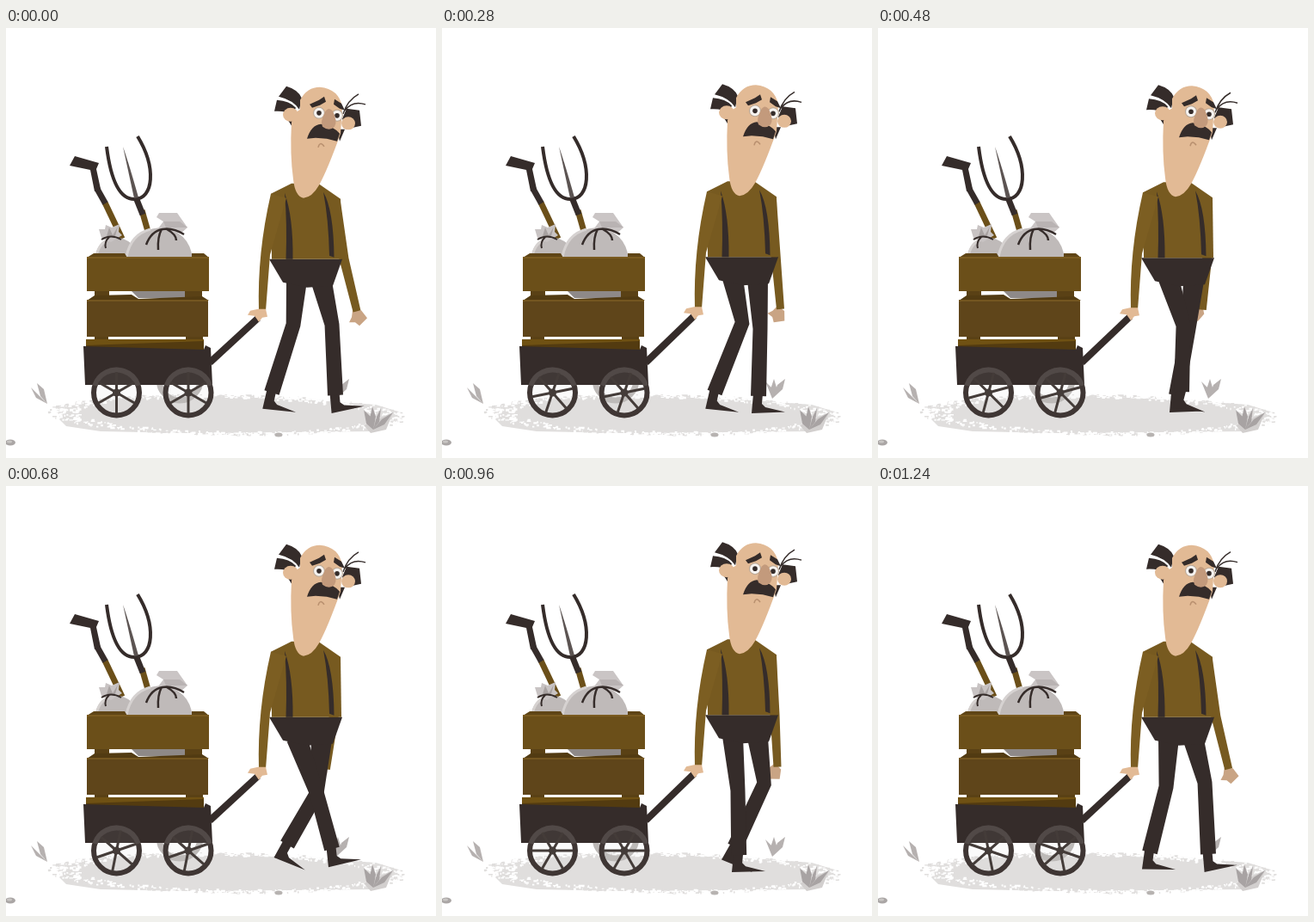
An HTML page with a canvas that plays this animation: 500x500 px, repeating every 1280 ms.

```html
<!DOCTYPE html>
<html lang="en">
<head>
<meta charset="utf-8">
<title>Farmer with a cart</title>
<style>
html, body { margin: 0; width: 100%; height: 100%; overflow: hidden; background: #fff; }
canvas { display: block; width: 500px; height: 500px; }
</style>
</head>
<body>
<canvas id="stage" width="500" height="500"></canvas>
<script>
const ctx = document.getElementById('stage').getContext('2d');
const LOOP = 1280, STEP = 40, TAU = Math.PI * 2;
const DARK = '#352c2a', OLIVE = '#6b4f19', SHIRT = '#775a20', SKIN = '#e2ba95', GREY = '#b6b1b0', SACK = '#bfbab9';

// Walk poses: time, knee x/y, ankle x/y, foot angle in degrees
const LEG_A = [
  [0, 334, 345, 309, 424, 8], [140, 343, 343, 304, 417, 30], [280, 349, 343, 317, 424, 8],
  [480, 355, 346, 353, 423, 10], [680, 361, 356, 379, 422, -11], [840, 350, 358, 359, 428, 0],
  [1080, 339, 350, 332, 429, 0], [1240, 335, 350, 316, 426, 3]
];
const LEG_B = [
  [0, 379, 345, 383, 427, -10], [280, 370, 350, 368, 428, 0], [480, 361, 350, 347, 427, 0],
  [680, 361, 358, 327, 417, 24], [840, 370, 350, 322, 414, 47], [1080, 378, 344, 363, 426, -3],
  [1240, 380, 345, 384, 428, -10]
];

function fill(color, d) {
  ctx.fillStyle = color;
  ctx.fill(new Path2D(d));
}
function line(color, width, d, cap = 'butt') {
  ctx.strokeStyle = color;
  ctx.lineWidth = width;
  ctx.lineCap = cap;
  ctx.stroke(new Path2D(d));
}
function oval(color, x, y, rx, ry = rx) {
  ctx.fillStyle = color;
  ctx.beginPath();
  ctx.ellipse(x, y, rx, ry, 0, 0, TAU);
  ctx.fill();
}
function ring(color, x, y, r, width, from = 0, to = TAU) {
  ctx.strokeStyle = color;
  ctx.lineWidth = width;
  ctx.lineCap = 'butt';
  ctx.beginPath();
  ctx.arc(x, y, r, from, to);
  ctx.stroke();
}

// Periodic cubic interpolation through the poses
function poseAt(keys, t) {
  const n = keys.length;
  const key = i => {
    const turn = Math.floor(i / n), k = keys[i - turn * n];
    return [k[0] + turn * LOOP, ...k.slice(1)];
  };
  let i = n - 1;
  while (keys[i][0] > t) i--;
  const [p, a, b, q] = [i - 1, i, i + 1, i + 2].map(key);
  const span = b[0] - a[0], u = (t - a[0]) / span;
  return a.slice(1).map((v, j) => {
    j++;
    const ma = (b[j] - p[j]) / (b[0] - p[0]) * span;
    const mb = (q[j] - a[j]) / (q[0] - a[0]) * span;
    const d = b[j] - v;
    return v + u * (ma + u * (3 * d - 2 * ma - mb + u * (ma + mb - 2 * d)));
  });
}

function makeSpecks(seed, count) {
  const path = new Path2D();
  const random = () => (seed = seed * 16807 % 2147483647) / 2147483647;
  for (let i = 0; i < count; i++) {
    const angle = random() * TAU, reach = 0.84 + random() * 0.18;
    path.rect(255 + Math.cos(angle) * 204 * reach, 449 + Math.sin(angle) * 23 * reach + Math.cos(angle) * 3,
      1 + random() * 4, 1 + random() * 1.5);
  }
  return path;
}
const greySpecks = makeSpecks(71, 650), whiteSpecks = makeSpecks(929, 420);

function ground() {
  fill('#e0dedd', 'M62 455L76 439L130 431L250 429L340 432L430 438L456 446L444 459L428 469L330 470L210 471L110 469L70 463Z');
  ctx.fillStyle = '#e0dedd';
  ctx.fill(greySpecks);
  ctx.fillStyle = '#fff';
  ctx.fill(whiteSpecks);
  fill(GREY, 'M29 418L48 437L35 430ZM36 413L44 420L48 437L40 428Z');
  fill(GREY, 'M376 411L383 418L384 431ZM386 408L389 418L384 431L382 420ZM399 408L396 420L384 431L390 415Z');
  fill('#d2cfce', 'M416 462L450 447L442 467L424 471Z');
  fill('#a8a3a3', 'M416 444L425 453L427 467L419 460ZM426 440L430 452L427 467L423 454ZM436 442L434 458L427 467L431 452ZM450 447L440 461L427 467L437 455Z');
  oval('#aaa6a5', 5, 482, 6, 3.5);
  oval('#c9c6c4', 4, 481, 3, 1.5);
  oval('#b7b3b1', 317, 473, 4.5, 2.5);
}

function tools() {
  line(OLIVE, 7, 'M115 203L135 245');
  line(DARK, 7, 'M106 187L115.5 204');
  fill(DARK, 'M80 149L108 157L105 164L110 187L103 190L98 165L74 160Z');
  line(OLIVE, 7, 'M158 212L166 240');
  line(DARK, 7, 'M151 197L159 217');
  line(DARK, 4, 'M117 138C121 170 130 199 149 199C172 199 175 162 153 126');
  fill('#5c5452', 'M136 138Q143 158 154 197L149 198Z');
}

function sacks() {
  fill(SACK, 'M103 268Q106 246 127 243Q151 246 154 268Z');
  line('#d6d2d0', 3, 'M105 265Q109 247 124 245');
  fill('#c8c3c3', 'M108 234L115 234L116 229L123 232L132 228L131 237L135 241L122 249L111 244Z');
  fill('#a8a2a1', 'M120 232L125 243L117 242ZM130 231L127 242L123 243Z');
  line(DARK, 2, 'M111 246Q122 239 134 246M120 243Q114 249 116 256');
  fill(SACK, 'M138 268Q143 235 180 232Q213 236 217 268Z');
  line('#d6d2d1', 3, 'M140 266Q145 240 168 234');
  fill('#cac5c5', 'M178 215L199 215L211 232L203 239L177 233L183 225L175 220Z');
  fill('#b9b3b3', 'M183 225L202 225L211 232L186 232Z');
  line(DARK, 2.5, 'M163 252Q169 236 182 234Q194 232 207 240M181 234Q176 243 177 258M187 234Q198 240 198 247');
}

function crate() {
  fill('#8e8988', 'M144 304H208V314H154Z');
  fill('#5a4115', 'M103 305H120V317H103ZM208 305H228V317H208ZM103 358H119V365H103ZM209 358H229V365H209Z');
  fill('#523b12', 'M94 317L103 311L146 310L154 315L228 312L236 317Z');
  fill('#5f4516', 'M94 267L102 262H138L141 267ZM216 262H230L236 267H216Z');
  fill(OLIVE, 'M94 267H236V306H94Z');
  line('#7a5b20', 2, 'M94 267H236');
  fill('#5f451a', 'M94 316H235V359H94Z');
  line('#745620', 2, 'M94 317H235');
  fill('#6f5113', 'M93 362H230V375H93Z');
  fill('#533b10', 'M93 369L230 364V375H93Z');
  fill(DARK, 'M90 370L230 374L232 369L238 372L240 415H92Z');
}

function wheel(x, y, turn) {
  oval('rgba(190,185,183,.08)', x, y, 26);
  ring('#3f3634', x, y, 26.5, 6);
  ring('#514947', x, y, 26.5, 6, Math.PI * 1.1, Math.PI * 1.9);
  ctx.save();
  ctx.translate(x, y);
  ctx.rotate(turn + TAU / 12);
  for (let i = 0; i < 6; i++) {
    ctx.rotate(TAU / 6);
    line('#443c39', 3, 'M0 0H24');
  }
  ctx.restore();
  oval('#443c39', x, y, 4.5);
}

function cart(turn, bob) {
  ring('#bdb9b7', 202, 409, 24, 7);
  tools();
  sacks();
  crate();
  line(DARK, 8, `M237 389L293 ${336 + bob}`);
  wheel(128.5, 424, turn);
  wheel(212, 424, turn);
}

// Tapered limb: joints are [x, y, half width]
function limb(color, joints) {
  const left = [], right = [];
  joints.forEach(([x, y, w], i) => {
    const a = joints[Math.max(i - 1, 0)], b = joints[Math.min(i + 1, joints.length - 1)];
    const len = Math.hypot(b[0] - a[0], b[1] - a[1]);
    const nx = (b[1] - a[1]) / len * w, ny = (a[0] - b[0]) / len * w;
    left.push([x - nx, y - ny]);
    right.unshift([x + nx, y + ny]);
  });
  fill(color, 'M' + left.concat(right).join('L') + 'Z');
}

function leg(keys, t, hipX, hipY) {
  const [kx, ky, ax, ay, angle] = poseAt(keys, t);
  ctx.save();
  ctx.translate(ax, ay);
  ctx.rotate(angle * Math.PI / 180);
  fill(DARK, 'M-6 -3L-8 20L31 18.5L8 13L4 9L5 -3Z');
  ctx.restore();
  limb(DARK, [[hipX, hipY, 12], [kx, ky, 8.5], [ax, ay, 9]]);
}

function farArm(swing) {
  const x = 390 + 18 * swing, y = 328;
  ctx.save();
  ctx.translate(x, y);
  ctx.rotate(0.8 * (1 - swing));
  fill('#c9a484', 'M-5 -1H5L12 8L3 17L-2 13L-9 13L-6 7Z');
  ctx.restore();
  limb(SHIRT, [[382, 201, 7], [387 + 6 * swing, 267, 5.5], [x, y, 4.5]]);
}

function torso() {
  fill(DARK, 'M306 267H391L380 298L350 300L322 294Z');
  fill(SHIRT, 'M308 191L332 179H363L389 197L390 267H309Z');
  fill(DARK, 'M324 190Q334 218 333.5 267H325.5Q327 225 324 190ZM369 189Q381 210 381.5 265L376 263Q375 220 369 189Z');
  fill('#7c5e22', 'M308 191L326 196L307 262L302 327H294Q292 260 308 191Z');
  fill(SKIN, 'M293 325H302L304 334L298 335L294 340L289 333L281 332L284 327Z');
}

function head() {
  fill(DARK, 'M326 66Q340 70 344 80L341 93Q334 82 317 78ZM315 82Q330 83 337 91L333 100Q326 94 312 95ZM327 104L336 97L334 115Z');
  fill(DARK, 'M396 92L411 94L413 112L399 115L391 104ZM385 116L394 116L388 130Z');
  oval(SKIN, 331, 99, 9, 8);
  oval(SKIN, 398, 109, 8, 7.5);
  fill(SKIN, 'M342 82Q350 67 365 67Q387 69 391 90L389 121Q374 163 364 181Q356 195 346 196Q336 194 334 174Q330 145 332 108Q334 97 342 93Z');
  line(DARK, 1.5, 'M392 98Q397 82 410 75M394 94Q403 82 418 87');
  for (const [x, y] of [[364, 97], [385, 100]]) {
    oval('#b9a795', x, y, 7);
    oval('#f6f3f0', x, y, 6);
    oval(DARK, x, y, 2.8);
  }
  fill(DARK, 'M353 87L364 82L370 78L372 84L365 88L356 91ZM382 81L390 86L394 94L388 92L381 87Z');
  fill(DARK, 'M350 127Q355 111 366 110Q382 113 388 121L385 130L373 127L360 126Z');
  fill('#c39a7c', 'M371 96Q375 89 380 95Q386 107 382 113Q376 119 368 113Q365 107 371 96Z');
  line('#b9906f', 1.5, 'M363 137Q365 129 370 136');
}

function draw(t) {
  const turn = t / LOOP * TAU;
  const bob = 1.4 * Math.cos(2 * turn - 0.2);
  ctx.fillStyle = '#fff';
  ctx.fillRect(0, 0, 500, 500);
  ground();
  cart(turn, bob);
  ctx.save();
  ctx.translate(0, bob);
  farArm(Math.cos(turn));
  ctx.restore();
  leg(LEG_B, t, 367, 294 + bob);
  leg(LEG_A, t, 338, 292 + bob);
  ctx.save();
  ctx.translate(0, bob + 0.5);
  torso();
  head();
  ctx.restore();
}

const start = performance.now();
function frame() {
  draw(Math.floor((performance.now() - start) / STEP) * STEP % LOOP);
  requestAnimationFrame(frame);
}
frame();
</script>
</body>
</html>
```
